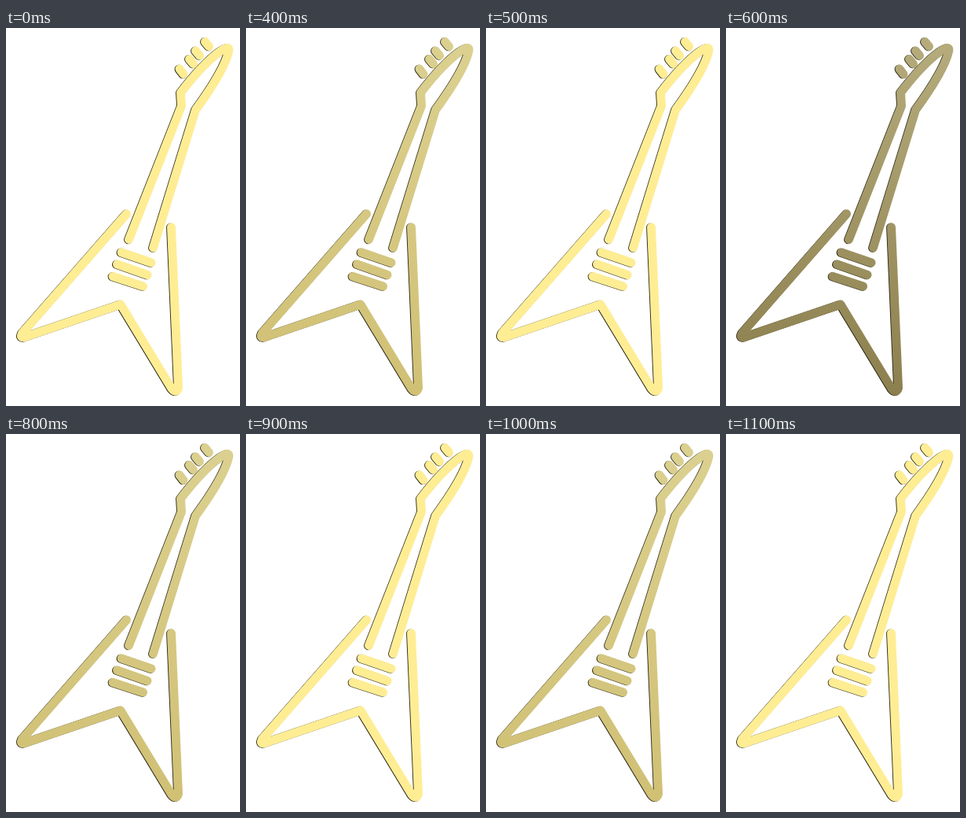
Write an HTML page that moves like this. It is 298 px wide and 480 px high and loops after 1200 ms.

```html
<!DOCTYPE html>
<html lang="en">
<head>
<meta charset="utf-8">
<title>Flickering guitar</title>
<style>
  html, body { margin: 0; width: 100%; height: 100%; overflow: hidden; background: #fff; }
  svg { display: block; width: 100vw; height: 100vh; }
  use { fill: none; stroke-width: 11; stroke-linecap: round; stroke-linejoin: round; }
</style>
</head>
<body>
<svg viewBox="0 0 298 480">
  <defs>
    <linearGradient id="glow" gradientUnits="userSpaceOnUse" x1="200" y1="12" x2="150" y2="467">
      <stop id="top" offset="0"/>
      <stop id="bottom" offset="1"/>
    </linearGradient>
    <g id="guitar">
      <!-- body -->
      <path d="M153.500 236 L20.500 387.500 Q17 395 25 392 L146 351 L211 458 Q217 465 219.500 457 L210.500 253"/>
      <!-- neck and head -->
      <path d="M156.500 268.500 L223.500 99 L222.500 82 Q251 45 273 29.500 Q286 21 283.500 30 Q278 54 241.500 104 L187.500 279"/>
      <!-- pickups -->
      <path d="M147 285 L185 298 M141.500 300 L180 313.500 M136 315.500 L174.500 328"/>
      <!-- tuning pegs -->
      <path d="M221 52 L226 58.500 M233.500 39.500 L238.500 45.500 M241.500 29 L246.500 35 M253.500 17.500 L258.500 23.500"/>
    </g>
  </defs>
  <use href="#guitar" x="-.9" y=".3" stroke="#2a2616"/>
  <use href="#guitar" stroke="url(#glow)"/>
</svg>
<script>
  const bright = ['#ffed94', '#ffed94'];
  const mid = ['#dbd08f', '#d0c074'];
  const dark = ['#b5ab7b', '#8c7f4e'];
  const STEP = 100;
  const flicker = [bright, bright, bright, bright, mid, bright, dark, bright, mid, bright, mid, bright];
  const stops = ['top', 'bottom'].map(id => document.getElementById(id));

  function draw(now) {
    const colors = flicker[Math.floor(now / STEP) % flicker.length];
    stops.forEach((stop, i) => stop.setAttribute('stop-color', colors[i]));
  }

  function tick() {
    draw(performance.now());
    requestAnimationFrame(tick);
  }
  tick();
</script>
</body>
</html>
```
